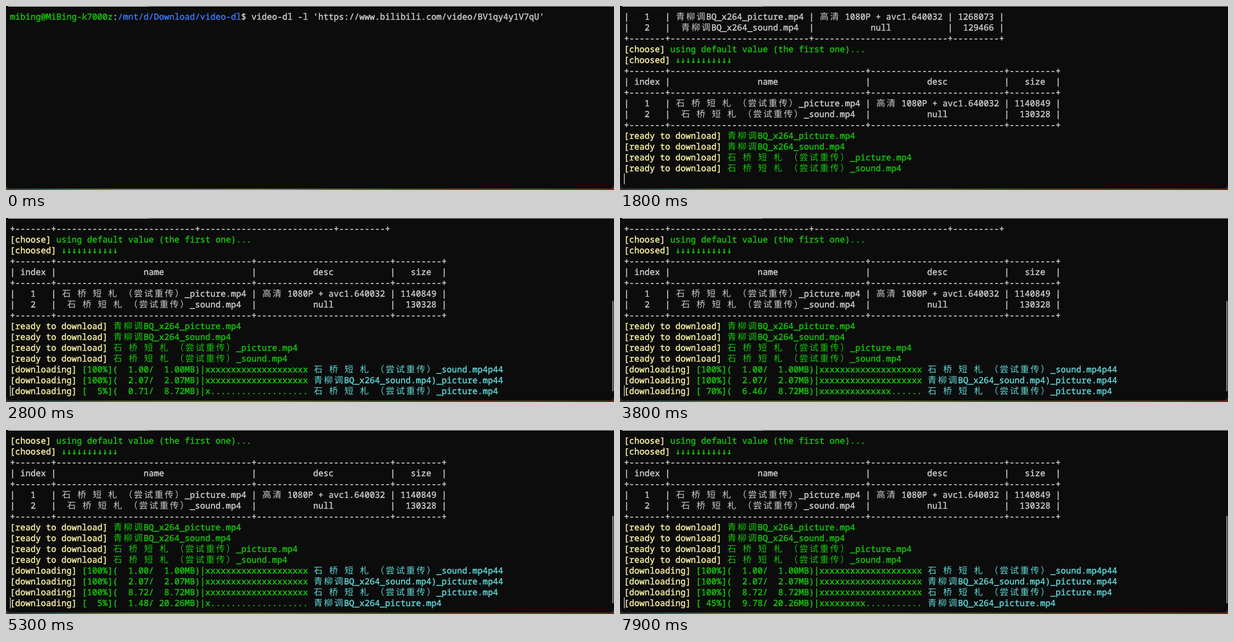
These frames come from a looping animation (1065x323 px, 8000 ms). An HTML page:

```html
<!DOCTYPE html>
<html lang="zh-CN">
<head>
<meta charset="utf-8">
<title>Terminal</title>
<style>
  html, body { margin: 0; width: 100%; height: 100%; overflow: hidden; background: #0c0c0c; }
  svg { display: block; width: 1065px; height: 323px; }
  text { font: 400 15px "Noto Sans Mono", "DejaVu Sans Mono", monospace; white-space: pre; font-variant-ligatures: none; text-rendering: geometricPrecision; stroke-width: .45px; }
  .han { font: 400 15.5px "Noto Sans CJK SC", "Noto Sans CJK", sans-serif; stroke-width: 0; }
  .arrow { font-family: "DejaVu Sans Mono", monospace; }
</style>
</head>
<body>
<svg viewBox="0 0 1065 323">
  <defs>
    <linearGradient id="desk">
      <stop offset="0" stop-color="#3a3f2a"/>
      <stop offset=".08" stop-color="#3f6a66"/>
      <stop offset=".18" stop-color="#7d8038"/>
      <stop offset=".42" stop-color="#8a8a3c"/>
      <stop offset=".64" stop-color="#4c6a2c"/>
      <stop offset=".75" stop-color="#7a4a24"/>
      <stop offset=".86" stop-color="#a0381c"/>
      <stop offset="1" stop-color="#742c18"/>
    </linearGradient>
  </defs>
  <rect width="1065" height="323" fill="#0c0c0c"/>
  <rect id="strip" y="313" width="1065" height="10" fill="url(#desk)"/>
  <path d="M0 0H1065V313Q1065 321 1057 321H8Q0 321 0 313Z" fill="#0c0c0c"/>
  <path d="M0 313Q0 320.5 8 320.5H1057Q1065 320.5 1065 313" fill="none" stroke="#2a2a2a"/>
  <rect x="249" width="816" height="1" fill="#a4a4a4"/>
  <rect x="4" width="245" height="1" fill="#ececec"/>
  <g id="screen"></g>
  <rect id="cursor" width="1" height="19" fill="#fff"/>
  <rect id="thumb" x="1062" width="2" fill="#8c8c8c"/>
</svg>
<script>
const $ = id => document.getElementById(id);
const LOOP = 8000, STEP = 100, CELL = 9, ROW = 19, LEFT = 7, ROWS = 16;
const GREY = '#cccccc', GREEN = '#16c60c', BLUE = '#3b78ff', YELLOW = '#f9f1a5', CYAN = '#61d6d6';

const songA = '青柳调BQ_x264', songB = '石 桥 短 札 （尝试重传）';
const picA = songA + '_picture.mp4', sndA = songA + '_sound.mp4';
const picB = songB + '_picture.mp4', sndB = songB + '_sound.mp4';
const url = 'https://www.bilibili.com/video/BV1qy4y1V7qU';

const isWide = c => c >= '\u2e80';
const cells = s => [...s].reduce((n, c) => n + (isWide(c) ? 2 : 1), 0);
const escape = s => s.replace(/&/g, '&amp;').replace(/</g, '&lt;');

// A row is a list of [colour, text] parts.
const plain = s => [[GREY, s]];
const tagged = (tag, s) => [[YELLOW, `[${tag}]`], [GREEN, ' ' + s]];

function center(s, width) {
  const gap = width - cells(s), left = Math.ceil(gap / 2);
  return ' '.repeat(left) + s + ' '.repeat(gap - left);
}

function table(nameWidth, files) {
  const widths = [7, nameWidth, 26, 9];
  const rule = plain('+' + widths.map(w => '-'.repeat(w) + '+').join(''));
  const line = row => plain('|' + row.map((s, i) => center(s, widths[i]) + '|').join(''));
  return [rule, line(['index', 'name', 'desc', 'size']), rule, ...files.map(line), rule];
}

const video = '高清 1080P + avc1.640032';
const command = [
  [GREEN, 'mibing@MiBing-k7000z'], [GREY, ':'],
  [BLUE, '/mnt/d/Download/video-dl'], [GREY, `$ video-dl -l '${url}'`]
];
const intro = [
  command,
  tagged('matched', 'bilibili'),
  tagged('parsing', 'video list...'),
  tagged('found', '2 videos'),
  tagged('getting', url),
  tagged('getting', 'stream info...')
];
const listing = [
  ...table(27, [['1', picA, video, '1268073'], ['2', sndA, 'null', '129466']]).slice(3),
  tagged('choose', 'using default value (the first one)...'),
  tagged('choosed', '↓'.repeat(11)),
  ...table(38, [['1', picB, video, '1140849'], ['2', sndB, 'null', '130328']]),
  ...[picA, sndA, picB, sndB].map(name => tagged('ready to download', name))
];

function progress(done, size, name) {
  const ticks = Math.floor(done / size * 20);
  const mb = n => n.toFixed(2).padStart(6);
  const bar = 'x'.repeat(ticks).padEnd(20, '.');
  const text = `[${String(ticks * 5).padStart(3)}%](${mb(done)}/${mb(size)}MB)|${bar} `;
  return [...tagged('downloading', text.trimEnd()), [CYAN, ' ' + name]];
}

// Shorter names leave the end of longer ones behind on the line.
const tailB = sndB + 'p44', tailA = sndA + ')_picture.mp44';
const opening = [
  [0.04, 8.72, picB], [0.22, 2.07, sndA + '）_picture.mp4'], [0.41, 1, tailB],
  [0.68, 2.07, sndA + '）_sound.mp4p4'], [1, 2.07, sndA + '）_sound.mp4p4'],
  [1.38, 2.07, tailA], [1.76, 2.07, tailA]
];
const finished = [
  [2500, 1, tailB], [2700, 2.07, tailA], [4200, 8.72, picB]
];
const speedB = [[2700, 0.14], [2800, 0.71], [3700, 5.9], [4200, 8.72]];
const speedA = [[4200, 0.08], [4300, 0.36], [5500, 1.7], [6200, 3.34], [6400, 3.9], [7300, 6.9], [7900, 9.78]];

function along(points, t) {
  let i = 1;
  while (i < points.length - 1 && t > points[i][0]) i++;
  const [t0, v0] = points[i - 1], [t1, v1] = points[i];
  return v0 + (v1 - v0) * (t - t0) / (t1 - t0);
}

function current(t) {
  if (t < 2700) return progress(...opening[(t - 2000) / STEP]);
  if (t < 4200) return progress(along(speedB, t), 8.72, picB);
  return progress(along(speedA, t), 20.26, picA);
}

function rowMarkup(parts, index) {
  const y = 24 + index * ROW;
  let col = 0, out = '';
  for (const [color, text] of parts) {
    for (const run of text.match(/[\u2e80-\uffef]|↓|[ -~]+/g)) {
      const wide = isWide(run);
      const style = wide ? 'han' : run === '↓' ? 'arrow' : '';
      out += `<text class="${style}" x="${LEFT + col * CELL + (wide ? 1 : 0)}" y="${y}" fill="${color}" stroke="${color}">${escape(run)}</text>`;
      col += cells(run);
    }
  }
  return out;
}

function state(t) {
  if (t < 1800) {
    const count = t < 1200 ? 1 : t < 1500 ? 3 : 6;
    const typing = t < 1100;
    return { rows: intro.slice(0, count), col: typing ? 104 : 0, row: typing ? 0 : count };
  }
  const rows = [...listing];
  if (t >= 2000) {
    const done = finished.filter(f => t >= f[0]);
    rows.push(...done.map(([, size, name]) => progress(size, size, name)), current(t));
    return { rows: rows.slice(-ROWS), col: 0, row: ROWS - 1, total: 28 + done.length };
  }
  return { rows, col: 0, row: ROWS - 1 };
}

function draw(t) {
  const { rows, col, row, total } = state(t);
  $('screen').innerHTML = rows.map(rowMarkup).join('');
  $('cursor').setAttribute('x', LEFT + col * CELL);
  $('cursor').setAttribute('y', 9 + row * ROW);
  $('cursor').setAttribute('opacity', t < 200 ? 0 : 1);
  $('strip').setAttribute('opacity', t < 300 ? 1 : 0.85);
  const height = total ? 297 * ROWS / total : 0;
  $('thumb').setAttribute('y', 304 - height);
  $('thumb').setAttribute('height', height);
}

let shown = -1;
function tick() {
  const t = Math.floor(performance.now() % LOOP / STEP) * STEP;
  if (t !== shown) draw(shown = t);
  requestAnimationFrame(tick);
}
tick();
</script>
</body>
</html>
```
